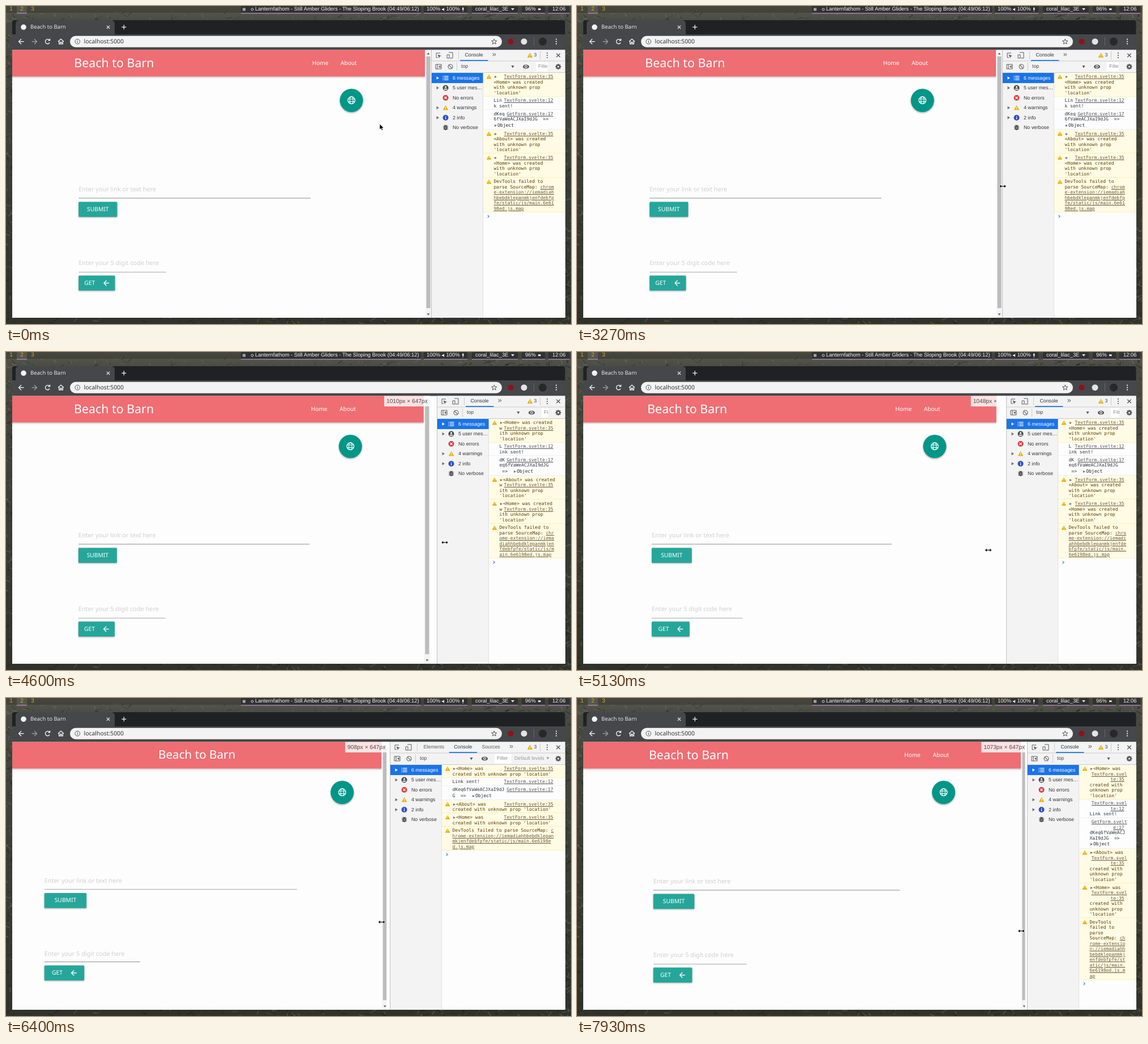
Write an HTML page with a canvas that moves like this. It is 998 px wide and 561 px high and loops after 8 s.

```html
<!DOCTYPE html>
<html lang="en">
<head>
<meta charset="utf-8">
<title>Resizing the developer tools</title>
<style>
html, body { margin: 0; width: 100%; height: 100%; overflow: hidden; background: #2c2f28; }
canvas, #log, svg { position: absolute; left: 0; top: 0; }
#log {
  top: 117.5px; right: auto; height: 432.5px; overflow: hidden; background: #fdfdfd;
  font: 8.04px/9.5px "DejaVu Sans Mono", monospace; color: #303942;
  text-rendering: geometricPrecision; white-space: pre-wrap; overflow-wrap: anywhere;
}
.msg { position: relative; box-sizing: border-box; padding: 2.6px 16px .8px 18.5px; border-bottom: 1px solid #f0f0f0; }
.warn { background: #fffbe5; color: #5c3c00; border-color: #fff0b8; }
.warn::before {
  content: "!"; position: absolute; left: 5.5px; top: 3px; width: 9px; height: 8px;
  background: #e8b20c; clip-path: polygon(50% 0, 100% 100%, 0 100%);
  color: #fff; font: bold 6.5px/9px "Liberation Sans", sans-serif; text-align: center;
}
.src { float: right; margin-left: 3.1px; text-align: right; }
.url { word-break: break-all; }
u { color: #545454; }
.warn u { color: #6a5a3a; }
.tri { display: inline-block; border: 2.5px solid transparent; border-left: 4px solid #6e6e6e; border-right: 0; margin: 0 1px 0 1.5px; }
.part { display: inline-block; }
.obj { display: inline-block; line-height: 11.4px; color: #222; }
.prompt { padding: 3px 0 0 5px; color: #367cf1; font: bold 13px/10px "DejaVu Sans Mono", monospace; }
</style>
</head>
<body>
<canvas id="back" width="998" height="561"></canvas>
<canvas id="front" width="998" height="561"></canvas>
<div id="log"></div>
<svg id="arrow" width="12" height="16" viewBox="-1 -1 12 16"><path d="M0 0V10L2.4 8 4 11.6 5.8 10.8 4.2 7.3H7.3Z" fill="#000" stroke="#fff" stroke-width=".7"/></svg>
<svg id="resize" width="16" height="12" viewBox="-8 -6 16 12"><path d="M-6 0L-2.5-3.5V-1H2.5V-3.5L6 0 2.5 3.5V1H-2.5V3.5Z" fill="#000" stroke="#fff" stroke-width=".8"/></svg>
<script>
const $ = id => document.getElementById(id);
const K = 998 / 1366, LEFT = 11, RIGHT = 987.5, TOP = 77.5, BOTTOM = 550;
const ARIAL = '"Liberation Sans", Arial, sans-serif', NOTO = '"Noto Sans", "Open Sans", sans-serif';
const TAU = Math.PI * 2;
let g;

function use(id) {
  g = $(id).getContext('2d');
  g.textRendering = 'geometricPrecision';
  g.textBaseline = 'middle';
  g.lineJoin = 'round';
}
function box(x, y, w, h, color, r = 0) {
  g.fillStyle = color;
  g.beginPath();
  g.roundRect(x, y, w, h, r);
  g.fill();
}
function disc(x, y, r, color) {
  g.fillStyle = color;
  g.beginPath();
  g.arc(x, y, r, 0, TAU);
  g.fill();
}
function ring(x, y, rx, ry, color, w = 1) {
  g.strokeStyle = color;
  g.lineWidth = w;
  g.beginPath();
  g.ellipse(x, y, rx, ry, 0, 0, TAU);
  g.stroke();
}
function path(color, w, x, y, pts, fill) {
  g.beginPath();
  for (let i = 0; i < pts.length; i += 2) g.lineTo(x + pts[i], y + pts[i + 1]);
  if (fill) { g.fillStyle = color; g.fill(); return; }
  g.strokeStyle = color;
  g.lineWidth = w;
  g.stroke();
}
const poly = (color, x, y, ...pts) => path(color, 0, x, y, pts, true);
const line = (color, w, x, y, ...pts) => path(color, w, x, y, pts);
function text(s, x, y, size, color, font = ARIAL, align = 'left') {
  g.font = `${size}px ${font}`;
  g.fillStyle = color;
  g.textAlign = align;
  g.fillText(s, x, y);
}
function clip(x, y, w, h, draw) {
  g.save();
  g.beginPath();
  g.rect(x, y, w, h);
  g.clip();
  draw();
  g.restore();
}
function cross(x, y, r, color, w) {
  line(color, w, x, y, -r, -r, r, r);
  line(color, w, x, y, -r, r, r, -r);
}
function dots(x, y, color) {
  for (const d of [-4, 0, 4]) disc(x, y + d, 1.1, color);
}
function warning(x, y) {
  poly('#e8b20c', x, y, 0, -4.5, 4.8, 4, -4.8, 4);
  box(x - .5, y - 1.5, 1, 3, '#fff');
  box(x - .5, y + 2.2, 1, 1, '#fff');
}
function backArrow(x, y, r, color, dir = 1) {
  line(color, 1.4, x, y, r * dir, 0, -r * dir, 0);
  line(color, 1.4, x, y, 0, -r, -r * dir, 0, 0, r);
}

// Desktop and browser frame, painted once
function wallpaper() {
  const shade = g.createLinearGradient(0, 0, 0, 561);
  [[0, '#5a5b4f'], [.05, '#484a42'], [.4, '#3c4037'], [.75, '#343830'], [1, '#2f332b']]
    .forEach(([p, c]) => shade.addColorStop(p, c));
  g.fillStyle = shade;
  g.fillRect(0, 0, 998, 561);
  let seed = 7;
  const rnd = () => (seed = seed * 16807 % 2147483647) / 2147483647;
  for (let i = 0; i < 420; i++) {
    const side = i % 4, x = side < 2 ? rnd() * 998 : side === 2 ? rnd() * 11 : 988 + rnd() * 10;
    const y = side === 0 ? 12 + rnd() * 13 : side === 1 ? 548 + rnd() * 13 : rnd() * 561;
    line(rnd() < .5 ? 'rgba(140,146,124,.3)' : 'rgba(12,15,10,.3)', .6 + rnd() * 1.4, x, y, 0, 0, rnd() * 24 - 12, rnd() * 16 - 8);
  }
}
function chip(x, w) {
  box(x, 0, w, 12, '#303232');
  box(x, 12, w, 1.5, '#a97fb0');
}
function statusBar() {
  box(0, 0, 998, 12, 'rgba(50,51,44,.5)');
  box(19, 0, 18, 12, '#56574f');
  box(19, 12, 18, 1.5, '#a97fb0');
  ['1', '2', '3'].forEach((s, i) => text(s, 9 + i * 19, 5.5, 10, '#d2ae21', ARIAL, 'center'));
  [[415, 318], [738, 77], [823, 81], [911, 41], [958, 37]].forEach(c => chip(...c));
  const say = (s, x) => text(s, x, 5.8, 9.4, '#f2f2f2');
  box(418.5, 3.5, 1.5, 5, '#eee');
  box(421, 3.5, 1.5, 5, '#eee');
  ring(435, 6, 2, 2, '#ddd', .9);
  say('Lanternfathom - Still Amber Gliders - The Sloping Brook (04:49/06:12)', 440);
  say('100%', 743);
  poly('#eee', 772, 6, -2, -1, 0, -1, 2, -3, 2, 3, 0, 1, -2, 1);
  say('100%', 777.5);
  box(806, 2.5, 2.4, 5, '#eee', 1.2);
  line('#eee', .8, 807.2, 8, 0, 0, 0, 2);
  say('coral_lilac_3E', 829);
  poly('#eee', 895, 5.5, -3, -1.5, 3, -1.5, 0, 2);
  say('96%', 917);
  box(940, 4.3, 4.5, 2.8, '#eee');
  say('12:06', 965);
}
function browserFrame() {
  box(LEFT, 25, RIGHT - LEFT, 26, '#1f2124', [4, 4, 0, 0]);
  box(17, 25, 175, 27, '#45474a', [6, 6, 0, 0]);
  box(LEFT, 50, RIGHT - LEFT, 28, '#45474a');
  disc(31, 37.3, 4.8, '#f4f4f4');
  text('Beach to Barn', 43, 37.3, 9.5, '#e6e6e6', NOTO);
  cross(180.5, 37.3, 2.7, '#e8e8e8', 1.1);
  line('#eee', 1.3, 208.3, 37.3, -4, 0, 4, 0);
  line('#eee', 1.3, 208.3, 37.3, 0, -4, 0, 4);
  backArrow(27, 62.7, 4.5, '#f0f0f0');
  backArrow(50, 62.7, 4.5, '#9a9b9d', -1);
  g.strokeStyle = '#f0f0f0';
  g.lineWidth = 1.4;
  g.beginPath();
  g.arc(73.5, 62.7, 4, .5, 5.5);
  g.stroke();
  poly('#f0f0f0', 77, 60, 1.2, -3, 1.2, 1.6, -3.2, 1.6);
  line('#f0f0f0', 1.4, 97, 62.7, -5, 0, 0, -4.5, 5, 0);
  line('#f0f0f0', 1.4, 97, 62.7, -3.3, -1, -3.3, 4.3, -1, 4.3, -1, 1, 1, 1, 1, 4.3, 3.3, 4.3, 3.3, -1);
  box(113, 52.8, 763, 20, '#f3f3f3', 10);
  ring(126.3, 62.7, 4.3, 4.3, '#505357', 1);
  box(125.8, 62, 1.1, 3, '#505357');
  box(125.8, 60.2, 1.1, 1.1, '#505357');
  text('localhost:5000', 137.5, 62.7, 10.4, '#333', NOTO);
  const star = [];
  for (let i = 0; i <= 10; i++) {
    const r = i % 2 ? 2.1 : 5, a = i * TAU / 10 - TAU / 4;
    star.push(r * Math.cos(a), r * Math.sin(a));
  }
  line('#555', 1, 862.3, 63, ...star);
  disc(891.5, 62.7, 5, '#8e1218');
  disc(915, 62.7, 5.5, '#e4e4e4');
  box(932, 55, 1, 15, '#66686a');
  disc(948, 62.7, 7, '#2a2728');
  dots(972, 62.7, '#f0f0f0');
}

// Web page, laid out for the width of its viewport
function page(edge) {
  const px = Math.round((edge - LEFT) / K), wide = px >= 993;
  const rem = (wide ? 14.5 : 14) * K, w = edge - LEFT - 15 * K;
  const pad = w * (wide ? .15 : .075), cw = w - 2 * pad;
  const x0 = LEFT + pad, x1 = x0 + cw, x = x0 + 7.8;
  box(LEFT, TOP, RIGHT - LEFT, BOTTOM - TOP, '#fdfdfd');
  ['.2', '.12', '.05'].forEach((a, i) => box(LEFT, 124.5 + i, w, 1, `rgba(0,0,0,${a})`));
  box(LEFT, TOP, w, 47, '#ee6e73');
  text('Beach to Barn', wide ? x0 : LEFT + w / 2, 101.5, 2.02 * rem, '#fff', NOTO, wide ? 'left' : 'center');
  if (wide) {
    text('Home', x1 - 90, 101, 10.1, '#fff', NOTO);
    text('About', x1 - 39.6, 101, 10.1, '#fff', NOTO);
  }
  g.save();
  g.shadowColor = 'rgba(0,0,0,.35)';
  g.shadowBlur = 3;
  g.shadowOffsetY = 1.5;
  disc(x1 - 20.5, 166.5, 20.5, '#009688');
  g.restore();
  globe(x1 - 20.5, 166.3);

  const wideField = cw * 10 / 12 - 15.6, slimField = cw / 3 - 15.6, up = wide ? 0 : 1.4;
  field('Enter your link or text here', x, 324 - up / 2, 339 - up, wideField);
  button(x, 345.5 - up, wideField / 6, 'SUBMIT');
  const y = wide ? 469.3 : 465.5;
  field('Enter your 5 digit code here', x, y - (wide ? 15.8 : 14), y, slimField);
  button(x, y + 6.3, slimField * 5 / 12, 'GET', slimField * 5 / 12 > 61);

  const sx = edge - 10;
  box(sx, TOP, 10, BOTTOM - TOP, '#f4f4f4');
  box(sx + 1.5, 89, 7, 444, '#bcbcbc');
  poly('#555', sx + 5, 84, -2.5, 1.5, 0, -1.5, 2.5, 1.5);
  poly('#555', sx + 5, 544, -2.5, -1.5, 0, 1.5, 2.5, -1.5);
  return px;
}
function globe(x, y) {
  ring(x, y, 6.3, 6.3, '#fff', 1.3);
  ring(x, y, 2.8, 6.3, '#fff', 1.1);
  line('#fff', 1.1, x, y, -5.8, -2.2, 5.8, -2.2);
  line('#fff', 1.1, x, y, -5.8, 2.2, 5.8, 2.2);
}
function field(hint, x, y, base, w) {
  clip(x, y - 10, w - 10.5, 20, () => text(hint, x, y, 10.9, '#d0d0d0', NOTO));
  box(x, base - .4, w, .9, '#8d8d8d');
}
function button(x, y, w, label, arrow) {
  g.save();
  g.shadowColor = 'rgba(0,0,0,.3)';
  g.shadowBlur = 2.5;
  g.shadowOffsetY = 1.3;
  box(x, y, w, 26.4, '#26a69a', 1.5);
  g.restore();
  const mid = x + w / 2;
  text(label, mid - (arrow ? 12.5 : 0), y + 13.2, 10.3, '#fff', NOTO, 'center');
  if (arrow) backArrow(mid + 17.2, y + 13.2, 4.6, '#fff');
}
function sizeLabel(edge, px) {
  const s = `${px}px × 647px`;
  g.font = `10.2px ${ARIAL}`;
  const w = g.measureText(s).width + 8;
  box(edge - w, TOP, w, 18.5, 'rgba(255,255,255,.8)');
  text(s, edge - w + 4, 87, 10.2, '#4c4c4c');
}

// Developer tools, laid out from their left edge
const GREY = '#5a5a5a', ALL = ['Elements', 'Console', 'Sources', 'Network', 'Performance'];
function tabRow(d) {
  const width = s => g.measureText(s).width + 17.2;
  g.font = `8.77px ${ARIAL}`;
  let n = 5;
  const total = list => list.reduce((sum, s) => sum + width(s), 0);
  while (n > 1 && d + 59 + total(ALL.slice(0, n)) > 906) n--;
  const tabs = n > 1 ? ALL.slice(0, n) : ['Console'];
  let x = d + 59.5;
  for (const s of tabs) {
    const w = width(s);
    text(s, x, 87, 8.77, s === 'Console' ? '#333' : GREY);
    if (s === 'Console') box(x - 8.5, 95.3, w, 1.6, '#1a73e8');
    x += w;
  }
  text('»', x - 1, 86, 12.5, GREY);
}
function filterRow(d) {
  line(GREY, 1, d + 13, 107, -5, -4, 5, -4, 5, 4, -5, 4, -5, -4);
  line(GREY, 1, d + 13, 107, -2, -4, -2, 4);
  poly(GREY, d + 14, 107, 2.5, -2.5, 2.5, 2.5, -1, 0);
  ring(d + 34, 107, 4, 4, GREY, 1.1);
  line(GREY, 1.1, d + 34, 107, -2.8, -2.8, 2.8, 2.8);
  box(d + 45, 100, 1, 14, '#ccc');
  text('top', d + 53, 107, 8.77, '#444');
  poly(GREY, d + 144, 107, -2.6, -2, 2.6, -2, 0, 2.4);
  if (d > 783) return;
  const e = d + 167.5;
  g.fillStyle = GREY;
  g.beginPath();
  g.ellipse(e, 107, 5.6, 3.6, 0, 0, TAU);
  g.fill();
  disc(e, 107, 2.4, '#f3f3f3');
  disc(e, 107, 1.3, GREY);
  const fx = d + 185, fw = Math.min(98, Math.max(21, .6 * (966 - d - 183) - 33));
  clip(fx, 98, Math.min(fw, 958 - fx), 18, () => {
    box(fx, 99, fw, 16, '#fff');
    text('Filter', fx + 4, 107, 8.77, '#8a8a8a');
  });
  clip(fx, 98, 962 - fx, 18, () => {
    text('Default levels', fx + fw + 5, 106.5, 8.77, '#9a9a9a');
    poly('#9a9a9a', fx + fw + 64, 106.5, -2.5, -2, 2.5, -2, 0, 2);
  });
}
function gear(x, y) {
  for (let i = 0; i < 4; i++) {
    const a = i * TAU / 8, c = 5 * Math.cos(a), s = 5 * Math.sin(a);
    line('#555', 2, x, y, -c, -s, c, s);
  }
  disc(x, y, 3.8, '#555');
  disc(x, y, 1.6, '#f3f3f3');
}
function sidebar(d) {
  box(d, 117.5, 92, BOTTOM - 117.5, '#f3f3f3');
  box(d, 118, 92, 18, '#1a73e8');
  ['6 messages', '5 user mes…', 'No errors', '4 warnings', '2 info', 'No verbose'].forEach((s, i) => {
    const y = 127 + i * 17.5, x = d + 25.5;
    text(s, d + 38, y + .3, 8.77, i ? '#333' : '#fff');
    if (i !== 2 && i !== 5) poly(i ? '#6e6e6e' : '#fff', d + 11.5, y, -2, -2.8, 2.4, 0, -2, 2.8);
    if (i === 0) for (const k of [-3, 0, 3]) {
      box(x - 5, y + k - .6, 1.4, 1.3, '#fff');
      box(x - 2.5, y + k - .6, 7.5, 1.3, '#fff');
    }
    if (i === 1) {
      disc(x, y, 5, '#4a4a4a');
      disc(x, y - 1.5, 1.7, '#f3f3f3');
      box(x - 3, y + 1.2, 6, 2, '#f3f3f3', 1);
    }
    if (i === 2) { disc(x, y, 5, '#e03b40'); cross(x, y, 2, '#fff', 1.2); }
    if (i === 3) warning(x, y);
    if (i === 4) {
      disc(x, y, 5, '#2f4fc4');
      box(x - .6, y - .8, 1.3, 3.6, '#fff');
      box(x - .6, y - 3, 1.3, 1.3, '#fff');
    }
    if (i === 5) {
      for (const k of [-2.5, 0, 2.5]) line('#444', 1, x, y + k, -4.5, 0, 4.5, 0);
      cross(x, y - 3, 2, '#444', 1);
      box(x - 2.7, y - 4, 5.4, 8.4, '#444', 2.7);
      box(x - 1.2, y - 1.2, 2.4, .9, '#f3f3f3');
      box(x - 1.2, y + 1.2, 2.4, .9, '#f3f3f3');
    }
  });
  box(d + 91.5, 117.5, 1, BOTTOM - 117.5, '#cfcfcf');
}
function devtools(d) {
  box(d, TOP, RIGHT - d, BOTTOM - TOP, '#f3f3f3');
  line(GREY, 1, d + 13, 87, 3, -4, -4, -4, -4, 4, -1, 4);
  poly(GREY, d + 13, 87, -1.5, -1.5, 5, 1, 2.2, 2, 1.2, 5);
  line(GREY, 1, d + 33, 87, -2, -5, 5, -5, 5, 5, 0, 5);
  line(GREY, 1, d + 33, 87, -5, -1, -1, -1, -1, 5, -5, 5, -5, -1);
  box(d + 48, 80, 1, 14, '#ccc');
  box(d, 96.6, RIGHT - d, .9, '#ccc');
  tabRow(d);
  warning(925.5, 87);
  text('3', 932.5, 87, 8.77, '#444');
  box(943, 80, 1, 14, '#ccc');
  dots(956, 87, '#555');
  cross(975.5, 87, 3.3, '#555', 1.3);
  filterRow(d);
  gear(975.5, 107);
  box(d, 117, RIGHT - d, .9, '#ccc');
  sidebar(d);
  box(d, TOP, .9, BOTTOM - TOP, '#bdbdbd');
}
function fillLog() {
  const tri = '<i class="tri"></i>', src = s => `<span class="src"><u>${s}</u>&nbsp;</span>`;
  const row = (body, kind = '') => `<div class="msg ${kind}">${body}</div>`;
  const prop = name => row(`${tri}${src('TextForm.svelte:35')}&lt;${name}&gt; was created with unknown prop 'location'`, 'warn');
  $('log').innerHTML = prop('Home') + row(src('TextForm.svelte:12') + 'Link sent!') +
    row(`${src('GetForm.svelte:17')}dKeq6fVaWeACJXaI9dJG <span class="part"> =&gt; </span> <span class="obj">${tri}Object</span>`) +
    prop('About') + prop('Home') +
    row('DevTools failed to parse SourceMap: <u class="url">chrome-extension://iemadiahhbebdklepanmkjenfdebfpfe/static/js/main.6e6198ed.js.map</u>', 'warn') +
    '<div class="prompt">›</div>';
}

// Motion: [ms, value] keys joined by smooth steps
const DRAG_X = [[3240, 752.5], [3705, 662], [3870, 662], [4750, 785.5], [4900, 785.5], [5550, 572.9], [5800, 572.9],
  [6300, 680], [6640, 588.9], [7070, 796.5], [7850, 796.5], [8050, 760]];
const DRAG_Y = [[3240, 318], [3705, 320], [4600, 336], [5550, 359], [6930, 413], [7930, 411]];
const HOVER_X = [[330, 660], [1330, 728], [1530, 728], [1870, 737], [2330, 742]];
const HOVER_Y = [[330, 208], [1330, 303], [1530, 303], [1870, 315], [2330, 317]];
// How far each part trails the hand, in ms
const LAG = { pointer: 8, panel: 45, tools: 90, page: 160 };
function at(keys, t) {
  if (t <= keys[0][0]) return keys[0][1];
  for (let i = 1; i < keys.length; i++) {
    const [a, v] = keys[i - 1], [b, w] = keys[i];
    if (t <= b) {
      const u = (t - a) / (b - a);
      return v + (w - v) * u * u * (3 - 2 * u);
    }
  }
  return keys[keys.length - 1][1];
}
function place(el, x, y, show) {
  el.style.display = show ? 'block' : 'none';
  el.style.transform = `translate(${x}px, ${y}px)`;
}

const STEP = 1000 / 15, LOOP = 8000;
const start = performance.now();
function frame(now) {
  const t = Math.floor((Math.max(0, now - start) % LOOP + 4) / STEP) * STEP;
  const edgeOf = part => at(DRAG_X, t - LAG[part]) - 1.5;
  const d = Math.round(edgeOf('tools')), edge = edgeOf('page'), panel = edgeOf('panel');
  g.clearRect(0, 0, 998, 561);
  const px = page(edge);
  if (t > 3400) sizeLabel(edge, px);
  if (panel < d) box(panel, TOP, d - panel, BOTTOM - TOP, '#fdfdfd');
  devtools(d);
  $('log').style.left = d + 92 + 'px';
  $('log').style.width = RIGHT - d - 92 + 'px';
  const hover = t < 2590;
  place($('arrow'), at(HOVER_X, t) - 1, at(HOVER_Y, t) - 1, hover);
  place($('resize'), at(DRAG_X, t - LAG.pointer) - 8, at(DRAG_Y, t) - 6, !hover);
  requestAnimationFrame(frame);
}

use('back');
wallpaper();
statusBar();
browserFrame();
fillLog();
use('front');
requestAnimationFrame(frame);
</script>
</body>
</html>
```
